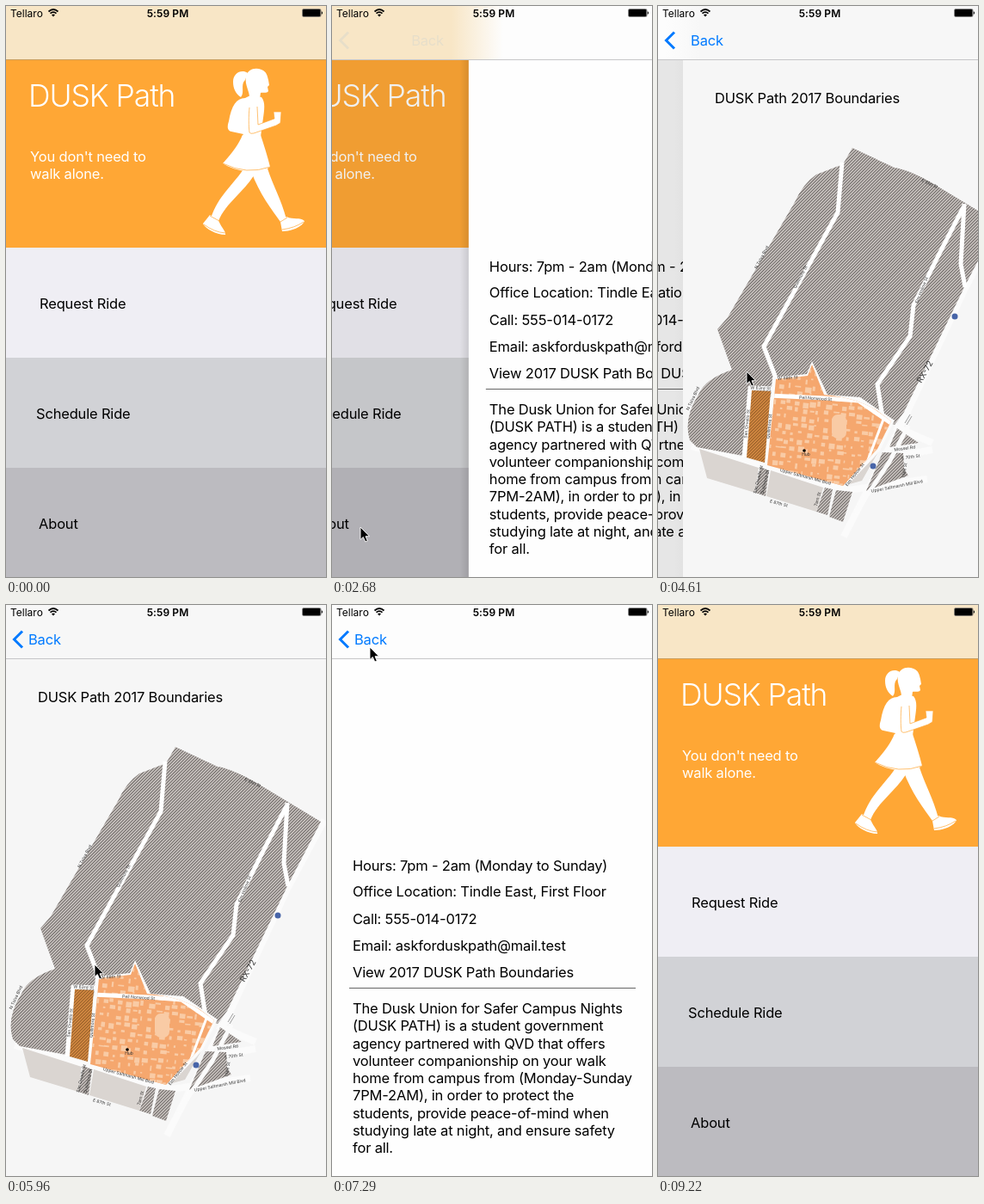
These frames come from a looping animation (372x664 px, 9820 ms). An HTML page:

```html
<!DOCTYPE html>
<html lang="en">
<head>
<meta charset="utf-8">
<title>Campus walk app</title>
<style>
  html, body { margin: 0; width: 100%; height: 100%; overflow: hidden; background: #fff; }
  svg { display: block; width: 372px; height: 664px; }
  text { font-family: Inter, "Open Sans", sans-serif; font-size: 16.5px; letter-spacing: -.18px; white-space: pre; }
  .street { font-size: 5px; letter-spacing: 0; fill: #333; text-anchor: middle; }
  .road { fill: none; stroke: #fff; stroke-linejoin: round; }
  .outer { stroke: #fbfbfb; }
</style>
</head>
<body>
<svg viewBox="0 0 372 664">
  <defs>
    <pattern id="hatch" width="2.55" height="2.55" patternUnits="userSpaceOnUse" patternTransform="rotate(45)">
      <rect width="2.55" height="2.55" fill="#d6d0cc"/><rect width="1.1" height="2.55" fill="#676260"/>
    </pattern>
    <pattern id="brownHatch" width="2.55" height="2.55" patternUnits="userSpaceOnUse" patternTransform="rotate(45)">
      <rect width="2.55" height="2.55" fill="#dd9046"/><rect width="1.1" height="2.55" fill="#915a25"/>
    </pattern>
    <linearGradient id="edge"><stop stop-opacity="0"/><stop offset="1" stop-opacity=".16"/></linearGradient>
    <linearGradient id="bar1">
      <stop stop-color="#fdfdfd" stop-opacity="0"/><stop offset=".15" stop-color="#fdfdfd"/>
    </linearGradient>
    <linearGradient id="bar2">
      <stop stop-color="#f7f7f7" stop-opacity="0"/><stop offset=".1" stop-color="#f7f7f7"/>
    </linearGradient>
    <clipPath id="campus"><path d="M108 434L145 430L150 417L164 452Q200 455 225 470L242 483L226 515L186 558L98 534L106 455Z"/></clipPath>
  </defs>

  <g class="screen">
    <rect width="372" height="281" fill="#ffa735"/>
    <rect y="281" width="372" height="128" fill="#efeef4"/>
    <rect y="409" width="372" height="128" fill="#d1d2d6"/>
    <rect y="537" width="372" height="127" fill="#bcbbc0"/>
    <g fill="#fff">
      <text x="26" y="117" style="font-size:35.5px;letter-spacing:-1.1px;font-weight:350">DUSK Path</text>
      <text x="28" y="181">You don't need to</text>
      <text x="28" y="201">walk alone.</text>
      <path d="M281 78C274 73 264 78 264 88C264 96 267 102 273 106C278 100 272 92 278 86Z"/>
      <path d="M279 82C281 73 290 71 297 74C303 76 304 82 305 86L306 92L304 94L305 99C303 102 298 100 296 101L295 108H283C284 100 277 92 279 82Z"/>
      <path d="M284 104L297 106C302 112 300 122 299 130L296 152H274L276 149L262 146C257 145 257 140 259 134C262 116 268 107 278 107Z"/>
      <path d="M275 150H296C300 162 304 175 307 187C297 194 270 195 252 183C262 172 270 162 275 150Z"/>
      <path d="M276 190C262 210 246 222 238 247L247 250C254 230 280 214 291 192Z"/>
      <path d="M285 192L304 189C310 208 320 225 326 248L319 251C310 238 294 218 285 192Z"/>
      <path d="M237 243L229 253C231 258 243 266 255 266C256 262 249 256 247 249Z"/>
      <path d="M319 251L326 245C334 249 342 245 347 250C344 257 332 262 321 262Z"/>
      <path d="M283 118C282 128 282 140 283 147Q284 149 288 148L314 139L319 136L320 123L311 123L312 131L293 138L292 117" stroke="#ffa735" stroke-width=".7"/>
    </g>
    <path d="M252 183Q280 197 307 187M237 244L248 250M319 251L327 246M230 254Q242 263 255 264M321 260Q336 258 346 251" fill="none" stroke="#ffa735" stroke-width=".7"/>
    <text x="39" y="352">Request Ride</text>
    <text x="35" y="480">Schedule Ride</text>
    <text x="38" y="608">About</text>
  </g>

  <g class="screen">
    <rect width="372" height="664" fill="#fefefe"/>
    <g id="details"></g>
    <path d="M20 445.500H353" stroke="#666"/>
  </g>

  <g class="screen">
    <rect width="372" height="664" fill="#f6f6f6"/>
    <text x="37" y="113">DUSK Path 2017 Boundaries</text>
    <path class="road outer" d="M370 250L328 328L258 478L187 617M10 512L100 538L192 563L284 550M246 489L290 508M234 526L290 516" stroke-width="8"/>
    <g fill="url(#hatch)">
      <path d="M197 165L246 188Q262 190 290 206L366 252L327 327L257 472L246 487L150 470L80 447L70 523L16 513L8 505Q0 480 18 452Q25 434 57 423L40 376L52 362L130 228Q140 206 155 196L186 184Z"/>
      <path d="M249 491L274 508L240 513ZM232 519L256 520L257 538L262 546L213 564Z"/>
      <path d="M90 536L100 540L96 570L84 566ZM165 560L174 562L168 592L155 588ZM178 563L197 565L186 600L170 594Z"/>
    </g>
    <path d="M19 515L88 537L84 566L28 549ZM102 540L163 560L155 588L97 570ZM222 525L233 508L208 552L190 557Z" fill="#dad5d1"/>
    <path class="road" d="M185 182L180 240L94 396L107 430V445L78 444L71 525M327 230L323 300L328 327M327 232L297 290L268 348L264 384L226 440L232 478" stroke-width="5"/>
    <path d="M104 432L144 428L150 413L168 452L206 455L246 482L229 517L188 561L95 536Z" fill="#fbfbfb"/>
    <path d="M80 447L102 448L95 531L74 525Z" fill="url(#brownHatch)"/>
    <g clip-path="url(#campus)">
      <rect x="90" y="410" width="160" height="155" fill="#f5a76e"/>
      <g id="buildings" fill="#f9cba5"></g>
      <path class="road" d="M100 453L165 456L204 459L246 488" stroke-width="5"/>
      <path class="road" d="M234 478L215 528L185 562" stroke-width="3"/>
    </g>
    <path class="road outer" d="M262 488L240 530L200 590" stroke-width="5"/>
    <path d="M258 485L264 475M260 487L266 477" stroke="#777" stroke-width=".7"/>
    <g fill="#4865a8"><circle cx="316" cy="361" r="3.500"/><circle cx="221" cy="535" r="3.500"/></g>
    <circle cx="141" cy="517" r="1.800"/>
    <g id="streets"></g>
  </g>

  <g id="nav">
    <rect id="barBase" width="372" height="62"/>
    <rect id="barTop" width="400" height="62"/>
    <path id="rule" d="M0 62.500H372"/>
    <path id="chevron" d="M19 30.500L9.500 40L19 49.500" fill="none" stroke="#007aff" stroke-width="3"/>
    <text class="back" y="46" fill="#007aff">Back</text>
    <text class="back" y="46" fill="#007aff">Back</text>
    <text x="5" y="12.500" style="font-size:12px;letter-spacing:0">Tellaro</text>
    <g fill="none" stroke="#000" stroke-width="1.700">
      <path d="M49.500 6.500Q55 1.500 60.500 6.500M51.500 8.700Q55 5.500 58.500 8.700"/>
    </g>
    <path d="M53 10.300Q55 8.600 57 10.300L55 12.400Z"/>
    <text x="188" y="12.500" text-anchor="middle" style="font-size:12px;letter-spacing:.1px;font-weight:600">5:59 PM</text>
    <rect x="344.500" y="3.500" width="21.500" height="9" rx="1.500" fill="none" stroke="#555" stroke-width=".7"/>
    <rect x="345" y="4" width="20.500" height="8" rx=".8"/>
    <path d="M366.800 6Q369.300 8 366.800 10Z"/>
  </g>
  <path id="cursor" d="M0 0V14.500L3.300 11.500L5.800 17L8.300 16L6 10.700H10.500Z" stroke="#fff" stroke-width=".9"/>
</svg>

<script>
const LOOP = 9820, WIDTH = 372;
const $ = id => document.getElementById(id);
const clamp = v => Math.max(0, Math.min(1, v));

function add(parent, name, attrs, content = '') {
  const node = document.createElementNS('http://www.w3.org/2000/svg', name);
  set(node, attrs);
  node.textContent = content;
  parent.append(node);
  return node;
}
function set(node, attrs) {
  for (const key in attrs) node.setAttribute(key, attrs[key]);
}

const contact = [
  [309, 'Hours: 7pm - 2am (Monday to Sunday)'],
  [339, 'Office Location: Tindle East, First Floor'],
  [371, 'Call: 555-014-0172'],
  [402, 'Email: askforduskpath@mail.test'],
  [433, 'View 2017 DUSK Path Boundaries']
];
const mission = [
  'The Dusk Union for Safer Campus Nights',
  '(DUSK PATH) is a student government',
  'agency partnered with QVD that offers',
  'volunteer companionship on your walk',
  'home from campus from (Monday-Sunday',
  '7PM-2AM), in order to protect the',
  'students, provide peace-of-mind when',
  'studying late at night, and ensure safety',
  'for all.'
];
contact.forEach(([y, line]) => add($('details'), 'text', { x: 24, y }, line));
mission.forEach((line, i) => add($('details'), 'text', { x: 24, y: 475 + i * 20.25 }, line));

const streets = [
  ['N Tolva Blvd', 93, 293, -62], ['N Tolva Blvd', 13, 457, -65],
  ['Quillmore St', 138, 316, -62], ['Quillmore St', 102, 489, -84],
  ['Elm Hollow St', 279, 331, -68], ['Elm Hollow St', 201, 546, -52],
  ['E 91st St', 286, 208, 25], ['W 68th St', 122, 434, -5], ['W 63rd St', 90, 446, 3],
  ['Pell Norwood St', 154, 458, 4], ['San Orvello St', 76, 486, -84],
  ['Upper Saltmarsh Mill Blvd', 142, 549, 15], ['Upper Saltmarsh Mill Blvd', 249, 560, -11],
  ['E 87th St', 111, 580, 15], ['Quillmore St', 97, 554, -76], ['San Orvello St', 89, 551, -76],
  ['Tarn St', 158, 574, -74], ['Mossel Rd', 258, 516, -8], ['E 70th St', 265, 526, -8],
  ['Hale St', 259, 540, -80], ['Hub', 143, 523, 0]
];
for (const [name, x, y, angle] of streets)
  add($('streets'), 'text', { class: 'street', transform: `translate(${x} ${y}) rotate(${angle})` }, name);
add($('streets'), 'text', {
  class: 'street', transform: 'translate(284 427) rotate(-60)', style: 'font-size:9.5px'
}, 'RX-72');

let seed = 7;
const random = () => (seed = seed * 16807 % 2147483647) / 2147483647;
for (let row = 0; row < 15; row++)
  for (let col = 0; col < 16; col++)
    add($('buildings'), 'rect', {
      x: 98 + col * 9 + random() * 4, y: 424 + row * 9 + random() * 4,
      width: 1.5 + random() * 6, height: 1.5 + random() * 5,
      transform: 'rotate(6 160 490)'
    });
add($('buildings'), 'rect', { x: 173, y: 475, width: 17, height: 28, rx: 7 });

const screens = [...document.querySelectorAll('.screen')].map(group => ({
  group,
  shade: add(group, 'rect', { width: WIDTH, height: 664 }),
  shadow: add(group, 'rect', { x: -10, y: 62, width: 10, height: 602, fill: 'url(#edge)' })
}));
const backs = document.querySelectorAll('.back');
const barColors = ['#f8e6c6', '#fdfdfd', '#f7f7f7'];

// Slides settle in four hard steps; depth counts the screens pushed.
const slide = (times, from, to) =>
  [.573, .922, .99, 1].map((p, i) => [times[i], from + (to - from) * p]);
const depthKeys = [
  [0, 0],
  ...slide([2680, 2830, 2980, 3130], 0, 1),
  ...slide([4460, 4610, 4760, 4910], 1, 2),
  ...slide([6850, 7000, 7140, 7290], 2, 1),
  ...slide([7580, 7730, 7870, 8020], 1, 0)
];
const cursorKeys = [
  [0], [1190, 23, 606], [1340, 33, 606],
  [3420, 46, 575], [3570, 78, 500], [3720, 110, 440], [3870, 108, 428], [4020, 103, 425],
  [5960, 103, 418], [6250, 85, 310], [6350, 62, 150], [6450, 48, 75], [6550, 44, 49],
  [8770, 75, 110], [8920, 250, 390], [9070, 356, 622], [9220]
];
const at = (keys, t) => keys.findLast(key => key[0] <= t);

function drawScreens(depth) {
  screens.forEach(({ group, shade, shadow }, i) => {
    const rel = depth - i;
    group.style.display = Math.abs(rel) < 1 ? '' : 'none';
    set(group, { transform: `translate(${rel < 0 ? -rel * WIDTH : -rel * .3 * WIDTH} 0)` });
    set(shade, { opacity: .1 * clamp(rel) });
    set(shadow, { opacity: clamp(-rel * 1.5) });
  });
}

function drawNav(depth) {
  const under = Math.floor(depth), progress = depth - under;
  set($('barBase'), { fill: barColors[under] });
  set($('barTop'), {
    x: WIDTH * (1 - progress) - 20,
    fill: `url(#bar${under + 1})`,
    visibility: progress ? 'visible' : 'hidden'
  });
  set($('rule'), { stroke: depth < .5 ? '#c99d5c' : '#c6c6c8' });
  set($('chevron'), { opacity: clamp((depth - .55) / .35) });
  backs.forEach((label, i) => {
    const rel = depth - i - 1;
    set(label, rel > 0
      ? { x: 26 - 60 * rel, opacity: clamp(1 - 2.2 * rel) }
      : { x: 26 - 155 * rel, opacity: clamp((rel + .45) / .35) });
  });
}

function draw(t) {
  const depth = at(depthKeys, t)[1];
  const [, x, y] = at(cursorKeys, t);
  drawScreens(depth);
  drawNav(depth);
  set($('cursor'), x === undefined
    ? { visibility: 'hidden' }
    : { visibility: 'visible', transform: `translate(${x} ${y})` });
}

function tick() {
  draw(performance.now() % LOOP);
  requestAnimationFrame(tick);
}
tick();
</script>
</body>
</html>
```
